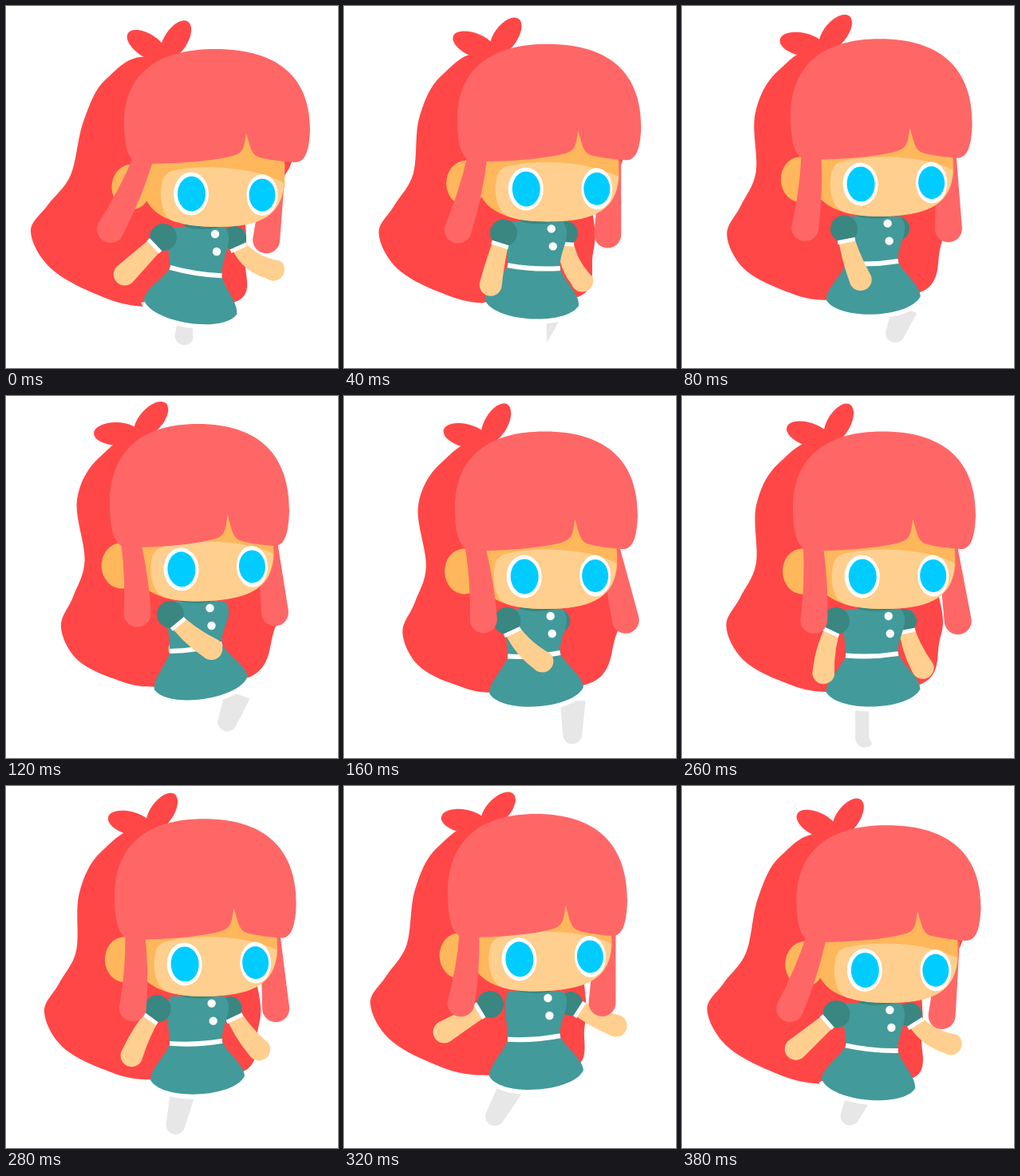
Recreate the animation shown at these times as an HTML page with a canvas. Size 416x454 px, loop 400 ms.

```html
<!DOCTYPE html>
<html lang="en">
<head>
<meta charset="utf-8">
<title>Running girl</title>
<style>
html, body { margin: 0; width: 100%; height: 100%; overflow: hidden; background: #fff; }
canvas { display: block; }
</style>
</head>
<body>
<canvas id="stage" width="416" height="454"></canvas>
<script>
const ctx = document.getElementById("stage").getContext("2d");
const LOOP = 400, STEP = 20;
const RED = "#ff4747", PINK = "#ff6767", SKIN = "#ffcf8f", SHADE = "#ffb75b";
const TEAL = "#439a9a", DARK = "#3a8681", BLUE = "#00ccff", GREY = "#e7e7e7", WHITE = "#fff";

const BANGS = new Path2D(`M168 198 C150 194 148 168 148 143 C150 85 190 54 262 54
  C344 54 381 92 381 155 C380 182 375 196 362 196 C345 195 330 193 318 190
  C307 187 306 175 301 160 C298 178 298 184 284 188 C260 194 220 198 168 198Z`);
const NAPE = new Path2D("M345 188 H359 C358 203 350 210 346 217Z");
const FACE = new Path2D("M172 150 H349 V225 C344 262 320 277 265 277 C215 277 172 264 172 225Z");
const CHEEK = new Path2D(`M212 206 C245 199 310 201 348 222 C346 262 320 277 265 277
  C240 277 220 274 208 269 C195 262 192 240 195 225 C196 213 203 207 212 206Z`);
const HEM = "C45 72 -45 72 -59 45";
const SKIRT = new Path2D(`M-33 0 Q0 4 33 0 C37 14 59 30 59 45 ${HEM} C-59 30 -37 14 -33 0Z`);
const TRIM = new Path2D("M59 48 C45 75 -45 75 -59 48");
const BELT = new Path2D("M-33 0 Q0 4 33 0");

// Lower-left outline of the loose hair, then its right side.
const HAIR = [[185, 66], [125, 92], [97, 145], [81, 212], [52, 250], [31, 283], [55, 328],
  [112, 361], [175, 377], [290, 370], [300, 320], [300, 272], [290, 150]];

let time = 0, lift = 0;

const radians = degrees => degrees * Math.PI / 180;

// Linear motion through the four turning points of the stride.
function swing(...values) {
  const turns = [0, 120, 200, 320, LOOP];
  const i = turns.findLastIndex(turn => turn <= time);
  const k = (time - turns[i]) / (turns[i + 1] - turns[i]);
  return values[i] + (values[(i + 1) % 4] - values[i]) * k;
}

function within(x, y, degrees, paint) {
  ctx.save();
  ctx.translate(x, y);
  ctx.rotate(radians(degrees));
  paint();
  ctx.restore();
}

function fill(color, path) {
  ctx.fillStyle = color;
  path ? ctx.fill(path) : ctx.fill();
}

function stroke(width, path) {
  ctx.strokeStyle = WHITE;
  ctx.lineWidth = width;
  ctx.stroke(path);
}

function oval(x, y, rx, ry, color) {
  ctx.beginPath();
  ctx.ellipse(x, y, rx, ry, 0, 0, Math.PI * 2);
  fill(color);
}

// Tapered shape hanging from the local origin; a positive bend bows it to the left.
function limb(length, top, end, bend, color) {
  const half = (top + end) / 2;
  ctx.beginPath();
  ctx.moveTo(-top, 0);
  ctx.quadraticCurveTo(-bend - half, length / 2, -end, length);
  ctx.arc(0, length, end, Math.PI, 0, true);
  ctx.quadraticCurveTo(half - bend, length / 2, top, 0);
  fill(color);
}

function blob(points, color) {
  const at = i => points[(i + points.length) % points.length];
  ctx.beginPath();
  ctx.moveTo(...points[0]);
  points.forEach((p, i) => {
    const a = at(i - 1), q = at(i + 1), b = at(i + 2);
    ctx.bezierCurveTo(p[0] + (q[0] - a[0]) / 6, p[1] + (q[1] - a[1]) / 6,
      q[0] - (b[0] - p[0]) / 6, q[1] - (b[1] - p[1]) / 6, ...q);
  });
  fill(color);
}

function drawHair() {
  const sway = swing(0, 46, 47, 10);
  blob(HAIR.map(([x, y]) => {
    const pull = sway * Math.max(0, Math.sin(Math.PI * (y - 165) / 250));
    return [x - 8 * lift + pull, y - 15 * lift + pull * (230 - x) / 440];
  }), RED);
  within(swing(199, 165, 191, 176), 64 - 15.5 * lift, 0, () => {
    within(0, 0, swing(33, 2, 27, 10), () => oval(-26, 0, 29, 14.5, RED));
    within(0, 0, swing(-57, -48, -72, -47), () => oval(25, 0, 28, 14.5, RED));
  });
}

function drawLegs() {
  const stride = Math.cos(2 * Math.PI * (time - 130) / LOOP);
  within(251 + 40 * stride, 390 - 16 * lift, swing(22, 21, -20, 29),
    () => limb(swing(25, 37, 48, 46), 16, 12, 0, GREY));
  within(242 - 14 * stride, 392, 0, () => limb(34, 14, 14, 0, WHITE));
}

function drawArm(x, y, degrees, length, bend, sleeve) {
  within(x, y, degrees, () => {
    limb(length, 9, 14, bend, SKIN);
    ctx.rotate(Math.atan(2 * bend / length));
    oval(0, 0, sleeve, sleeve, DARK);
    ctx.fillStyle = WHITE;
    ctx.fillRect(-11, sleeve - 4, 22, 5);
  });
}

function drawDress() {
  const hipX = 238, hipY = 333 - 17.5 * lift, tilt = swing(9, -8, 0, -4);
  const dx = 33 * Math.cos(radians(tilt)), dy = 33 * Math.sin(radians(tilt));
  const neckY = 277 - 20 * lift;
  ctx.beginPath();
  ctx.moveTo(206, neckY);
  ctx.lineTo(274, neckY);
  ctx.bezierCurveTo(288, neckY + 18, hipX + dx - 2, hipY + dy - 22, hipX + dx, hipY + dy);
  ctx.lineTo(hipX - dx, hipY - dy);
  ctx.bezierCurveTo(hipX - dx, hipY - dy - 22, 198, neckY + 18, 206, neckY);
  fill(TEAL);
  within(hipX, hipY, tilt, () => {
    stroke(6, TRIM);
    fill(TEAL, SKIRT);
    stroke(6, BELT);
  });
  within(-6.5 * lift, -20 * lift, 0, () => {
    oval(246, 275, 23, 5, DARK);
    oval(262, 286, 5.2, 5.2, WHITE);
    oval(264, 308, 5.2, 5.2, WHITE);
  });
}

function drawFace() {
  within(265 - 12.5 * lift, 237 - 20 * lift, -3.2 * lift, () => {
    ctx.translate(-265, -237);
    oval(157, 227, 24.5, 28.5, SHADE);
    fill(SHADE, FACE);
    fill(SKIN, CHEEK);
    oval(232, 235.5, 22, 27, WHITE);
    oval(232.5, 235.5, 17.5, 22, BLUE);
    oval(321, 237, 19.5, 26, WHITE);
    oval(321, 237, 16.5, 20.5, BLUE);
  });
}

// The fringe narrows and grows taller as the head rises.
function drawFringe(path, color) {
  within(148 - 18 * lift, 54 - 19 * lift, 0, () => {
    ctx.scale(1 - 0.0345 * lift, 1 + 0.077 * lift);
    ctx.translate(-148, -54);
    fill(color, path);
  });
}

function drawLock(x, y, degrees, bend) {
  within(x, y, degrees, () => limb(97 - 11 * lift, 12.5, 17, bend, PINK));
}

function draw() {
  ctx.fillStyle = WHITE;
  ctx.fillRect(0, 0, 416, 454);
  drawHair();
  drawLegs();
  drawArm(swing(286, 262, 274, 284), 291 - 18 * lift,
    swing(-51, 45, 22, -64), 63, swing(16, 8, 8, 4), 15);
  drawDress();
  drawArm(swing(197, 206, 203, 183), 290 - 16 * lift,
    swing(46, -50, -32, 59), 67, swing(0, 6, 14, 0), 17);
  drawFringe(NAPE, RED);
  drawLock(338 - 10 * lift, 197 - 11 * lift, swing(7, -6, -19, 3), 0);
  drawFace();
  drawLock(172 - 15 * lift, 192 - 5 * lift, swing(25, -5, -8, 7), -4);
  drawFringe(BANGS, PINK);
}

function tick() {
  time = Math.floor(performance.now() % LOOP / STEP) * STEP;
  const bob = time % 200;
  lift = bob < 120 ? bob / 120 : (200 - bob) / 80;
  draw();
  requestAnimationFrame(tick);
}
tick();
</script>
</body>
</html>
```
